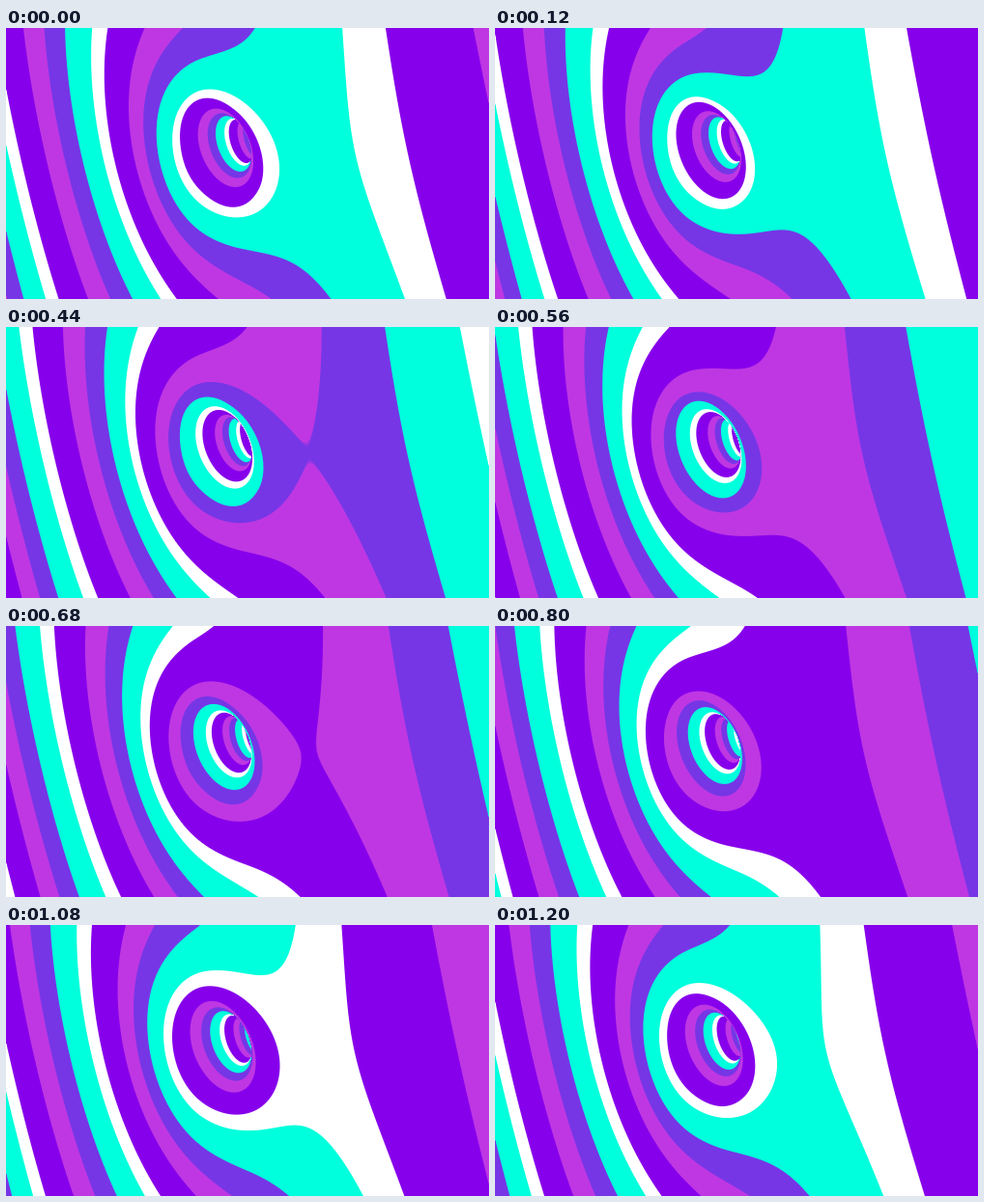
These frames come from a looping animation (500 by 281 pixels, 1.24 s). An HTML page with a canvas:

```html
<!DOCTYPE html>
<html lang="en">
<head>
<meta charset="utf-8">
<title>Striped tunnel</title>
<style>
html, body { margin: 0; width: 100%; height: 100%; overflow: hidden; background: #8700eb; }
canvas { display: block; width: 500px; height: 281px; }
</style>
</head>
<body>
<canvas id="stage" width="500" height="281"></canvas>
<script>
const W = 500, H = 281, STEP = 40, STEPS = 31;
const ctx = document.getElementById('stage').getContext('2d');

// Stripe colours, and where each one starts within a period of 1.
const STRIPES = [
  { from: 0, rgb: [135, 0, 235] },
  { from: 0.27, rgb: [191, 55, 227] },
  { from: 0.46, rgb: [118, 54, 230] },
  { from: 0.643, rgb: [0, 255, 220] },
  { from: 0.873, rgb: [255, 255, 255] }
];

const HOLE = { x: 222, y: 128.5 };
const ASPECT = 0.68, RING_LEAN = 0.243, WALL_LEAN = 0.22;
const MOUTH = 0.96, DEEPEST = 3.4, SLICE = 0.01;

const sq = v => v * v;
const smooth = t => t * t * (3 - 2 * t);

// A leaning ellipse that shrinks with depth while the tube bends to the upper right.
function ringAt(depth) {
  const d = depth - 1;
  const ry = 37 / (depth - 0.36);
  return {
    depth, ry,
    rx: ry * ASPECT / (1 + 0.35 * d * d),
    x: HOLE.x - 0.5 + 21.8 * d,
    y: 113 + 15.8 * Math.exp(-1.25 * d)
  };
}

// Less than 1 inside the ring.
function ringValue(ring, x, y) {
  const dy = y - ring.y;
  return Math.hypot((x - ring.x - RING_LEAN * dy) / ring.rx, dy / ring.ry);
}

const rings = [];
for (let d = MOUTH; d <= DEEPEST; d += SLICE) rings.push(ringAt(d));

// Nearer rings hide the deeper ones: the first ring that excludes the point wins.
function tunnelDepth(x, y) {
  let before = ringValue(rings[0], x, y);
  for (let i = 1; i < rings.length; i++) {
    const value = ringValue(rings[i], x, y);
    if (value >= 1) return rings[i - 1].depth + SLICE * (1 - before) / (value - before);
    before = value;
  }
  return DEEPEST;
}

// A leaning slope, steeper to the left, drawn into the hole.
function wallDepth(x, y) {
  const dx = x - HOLE.x, dy = y - HOLE.y;
  const across = dx - WALL_LEAN * dy;
  const radius = Math.hypot((dx - RING_LEAN * dy) / ASPECT, dy);
  const slope = 0.2326 + 0.0033 * across;
  const leftBend = -1.55e-5 * sq(Math.min(0, across));
  const lip = 0.36 / sq(1 + sq((across + 50) / 70) + sq((dy - 25) / 146));
  const sag = -0.16 * Math.exp(-sq((across + 60) / 140)) * sq((dy + 10) / 162);
  return slope + leftBend + lip + sag + 36 / Math.max(radius, 20);
}

function depthAt(x, y) {
  const edge = ringValue(rings[0], x, y);
  if (edge >= 1) return wallDepth(x, y);
  const inner = tunnelDepth(x, y);
  if (edge < 0.85) return inner;
  const k = smooth((1 - edge) / 0.15), outer = wallDepth(x, y);
  return outer + (inner - outer) * k;
}

const depth = new Float32Array(W * H), spread = new Float32Array(W * H);
for (let y = 0, i = 0; y < H; y++) {
  for (let x = 0; x < W; x++, i++) depth[i] = depthAt(x + 0.5, y + 0.5);
}

// Depth covered by one pixel, for smooth stripe edges.
for (let y = 0, i = 0; y < H; y++) {
  for (let x = 0; x < W; x++, i++) {
    const gx = depth[x < W - 1 ? i + 1 : i] - depth[x ? i - 1 : i];
    const gy = depth[y < H - 1 ? i + W : i] - depth[y ? i - W : i];
    spread[i] = Math.min(0.09, Math.max(0.001, Math.hypot(gx, gy) / 2));
  }
}

const image = ctx.createImageData(W, H);
image.data.fill(255);

function draw(shift) {
  const data = image.data, last = STRIPES.length - 1;
  for (let i = 0; i < depth.length; i++) {
    const phase = depth[i] - shift - Math.floor(depth[i] - shift);
    let band = last;
    while (phase < STRIPES[band].from) band--;
    const toStart = phase - STRIPES[band].from;
    const toEnd = (band < last ? STRIPES[band + 1].from : 1) - phase;
    const mix = Math.max(0, 0.5 - Math.min(toStart, toEnd) / spread[i]);
    const own = STRIPES[band].rgb;
    const other = STRIPES[(band + (toStart < toEnd ? last : 1)) % STRIPES.length].rgb;
    for (let c = 0; c < 3; c++) data[i * 4 + c] = own[c] + (other[c] - own[c]) * mix;
  }
  ctx.putImageData(image, 0, 0);
}

let shown = -1;
function tick() {
  const step = Math.floor(performance.now() / STEP) % STEPS;
  if (step !== shown) draw((shown = step) / STEPS);
  requestAnimationFrame(tick);
}
tick();
</script>
</body>
</html>
```
